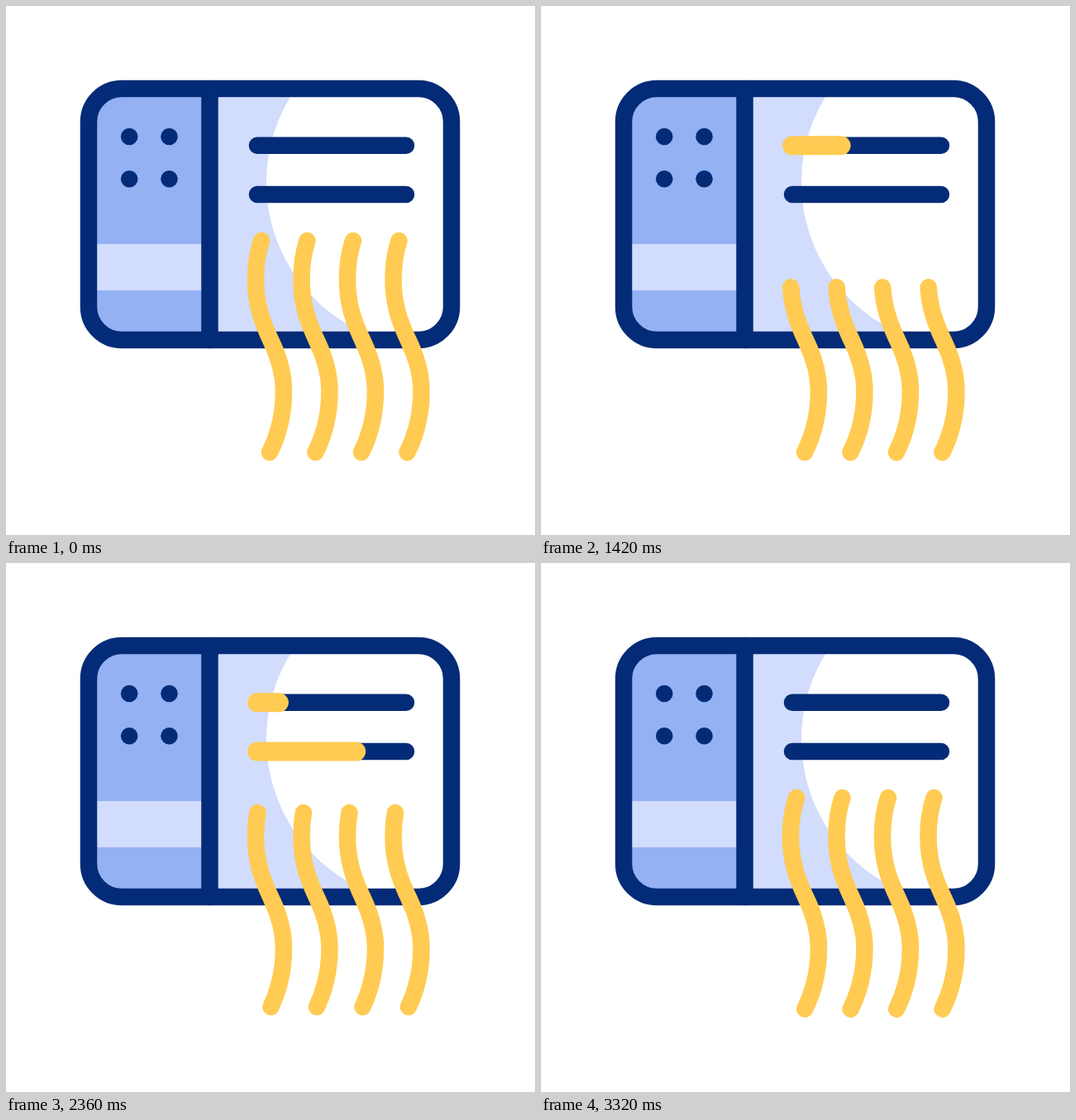
Animation, 640 px wide and 640 px high, one loop 3600 ms. Source, as an HTML page:

```html
<!DOCTYPE html>
<html lang="en">
<head>
<meta charset="utf-8">
<title>Air conditioner</title>
<style>
  html, body { margin: 0; width: 100%; height: 100%; overflow: hidden; background: #fff; }
  svg { display: block; width: 100vw; height: 100vh; }
  .line { fill: none; stroke: #042b77; stroke-width: 20.5; stroke-linecap: round; }
  .glow { fill: none; stroke: #ffcb52; stroke-linecap: round; }
</style>
</head>
<body>
<svg viewBox="0 0 640 640">
  <defs>
    <clipPath id="body"><rect x="100" y="100" width="439" height="304" rx="40"/></clipPath>
  </defs>
  <g clip-path="url(#body)">
    <rect x="100" y="100" width="146" height="304" fill="#93b1f3"/>
    <rect x="100" y="288" width="146" height="56" fill="#d2dcfd"/>
    <rect x="246" y="100" width="293" height="304" fill="#d2dcfd"/>
    <circle cx="514" cy="213.5" r="199" fill="#fff"/>
  </g>
  <rect class="line" x="100" y="100" width="439" height="304" rx="40"/>
  <path class="line" d="M246.5 100V404M304 168.8H484M304 228H484"/>
  <g id="dots" fill="#042b77"></g>
  <g id="bars" class="glow" stroke-width="23"></g>
  <g id="waves" class="glow" stroke-width="20.5"></g>
</svg>
<script>
const LOOP = 3600;
const WAVE = "M309 284C304 299 302 315 302 331C302 361 310 383 321 406" +
             "C331 427 336 445 336 466C336 492 330 518 319 540";

// [start, duration] in ms
const BLINK = { start: 360, every: 620 / 3, on: 180 };
const BARS = [
  { y: 168.8, grow: [1240, 470], shrink: [1676, 905] },
  { y: 228, grow: [1462, 470], shrink: [1990, 960] }
];
const STROKES = [
  { tail: [1206, 720] },
  { head: [1614, 800], tail: [2244, 720] },
  { head: [2538, 800] }
];

function add(parent, tag, attrs) {
  const el = document.createElementNS("http://www.w3.org/2000/svg", tag);
  for (const key in attrs) el.setAttribute(key, attrs[key]);
  document.getElementById(parent).append(el);
  return el;
}

function ease(t, [start, length]) {
  const u = Math.min(1, Math.max(0, (t - start) / length));
  return u * u * (3 - 2 * u);
}

function trim(el, from, to) {
  const shown = to > 0 && from < 1 && to >= from;
  el.style.display = shown ? "" : "none";
  if (!shown) return;
  el.style.strokeDasharray = `${to - from} 3`;
  el.style.strokeDashoffset = -from;
}

const dots = [0, 1, 2, 3].map(i =>
  add("dots", "circle", { cx: 149.2 + 48.3 * (i % 2), cy: i < 2 ? 158 : 209.2, r: 10.3 }));

const bars = BARS.map(({ y }) =>
  add("bars", "path", { d: `M303.7 ${y}H483.5`, pathLength: 1 }));

const waves = STROKES.map(() => [0, 1, 2, 3].map(i =>
  add("waves", "path", { d: WAVE, pathLength: 1, transform: `translate(${55.5 * i} 0)` })));

function draw(t) {
  dots.forEach((dot, i) => {
    const age = t - BLINK.start - i * BLINK.every;
    const lit = age >= -0.5 && age < BLINK.on - 0.5;
    dot.setAttribute("fill", lit ? "#ffcb52" : "#042b77");
    dot.setAttribute("r", lit ? 11.7 : 10.3);
  });
  BARS.forEach(({ grow, shrink }, i) =>
    trim(bars[i], 0, ease(t, grow) * (1 - ease(t, shrink))));
  STROKES.forEach(({ head, tail }, i) => {
    const to = head ? ease(t, head) : 1;
    const from = tail ? ease(t, tail) : 0;
    waves[i].forEach(wave => trim(wave, from, to));
  });
}

const begin = performance.now();
function tick() {
  draw((performance.now() - begin) % LOOP);
  requestAnimationFrame(tick);
}
tick();
</script>
</body>
</html>
```
